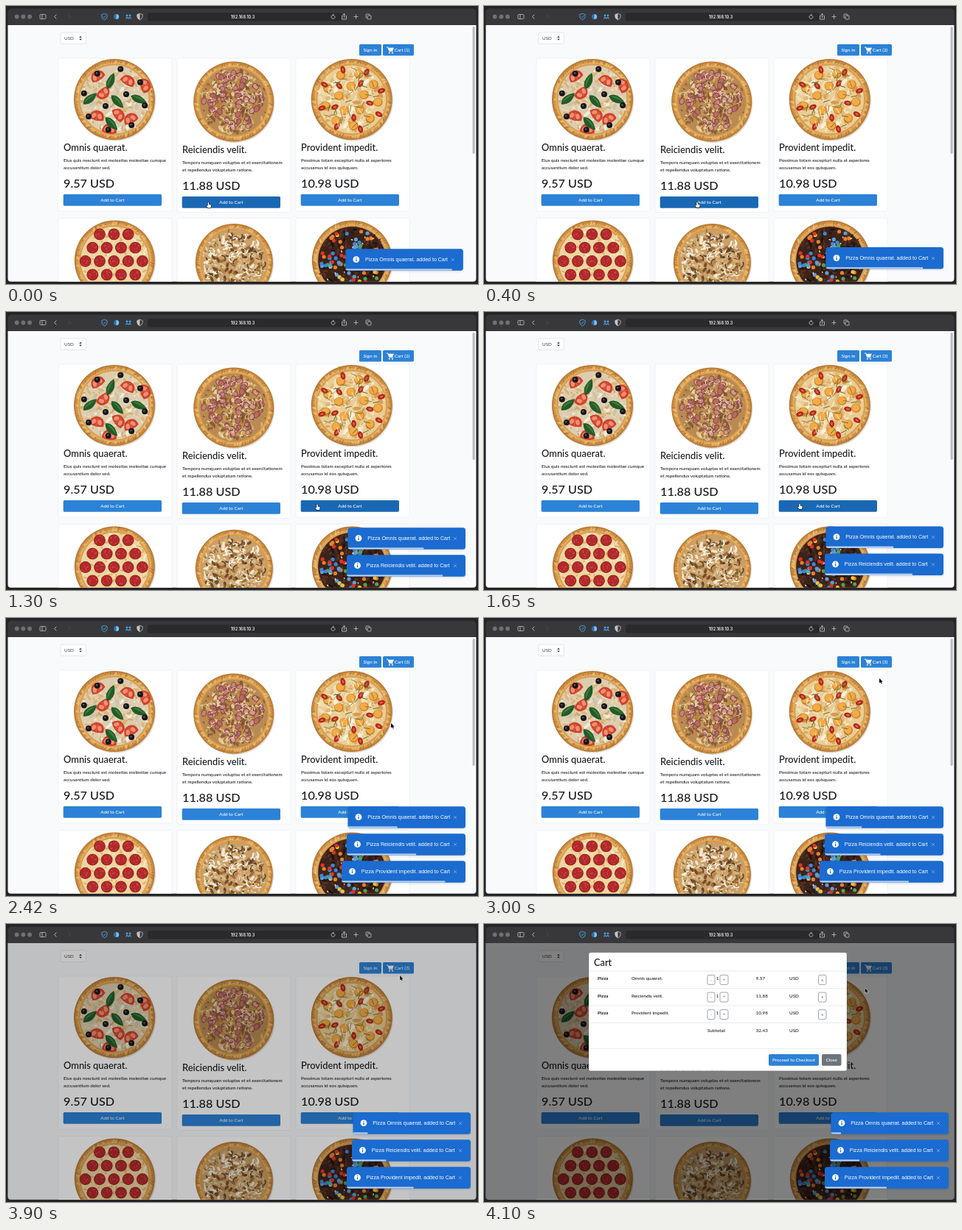
An HTML page with a canvas that plays this animation: 640 px wide and 378 px high, repeating every 8 s.

```html
<!DOCTYPE html>
<html lang="en">
<head>
<meta charset="utf-8">
<title>Pizza shop</title>
<style>
html, body { margin: 0; width: 100%; height: 100%; overflow: hidden; background: #242427; }
canvas { display: block; width: 100vw; height: 100vh; }
</style>
</head>
<body>
<canvas id="stage"></canvas>
<script>
const W = 640, H = 378, LOOP = 8000;
const BLUE = '#2c82d6', BLUE_HOVER = '#1a68b4', INK = '#171a1d', TOAST = '#1b6bd0';
const BODY = 'Lato, sans-serif';
const dpr = Math.max(1, window.devicePixelRatio || 1);

function prepare(canvas) {
  canvas.width = W * dpr;
  canvas.height = H * dpr;
  const ctx = canvas.getContext('2d');
  ctx.scale(dpr, dpr);
  return ctx;
}
const stage = prepare(document.getElementById('stage'));
const pageCanvas = document.createElement('canvas');
let c = prepare(pageCanvas);

// ---- drawing helpers ----
function box(x, y, w, h, r, fill, stroke, lw = 0.6) {
  c.beginPath();
  c.roundRect(x, y, w, h, r);
  if (fill) { c.fillStyle = fill; c.fill(); }
  if (stroke) { c.strokeStyle = stroke; c.lineWidth = lw; c.stroke(); }
}
function dot(x, y, r, fill) {
  c.fillStyle = fill;
  c.beginPath();
  c.arc(x, y, r, 0, 7);
  c.fill();
}
function arc(x, y, r, from, to, color, lw) {
  c.strokeStyle = color;
  c.lineWidth = lw;
  c.beginPath();
  c.arc(x, y, r, from, to);
  c.stroke();
}
function line(color, lw, ...p) {
  c.strokeStyle = color;
  c.lineWidth = lw;
  c.beginPath();
  for (let i = 0; i < p.length; i += 2) c.lineTo(p[i], p[i + 1]);
  c.stroke();
}
function text(s, x, y, size, color = INK, align = 'left', weight = 500, family = BODY) {
  c.font = `${weight} ${size}px ${family}`;
  c.textAlign = align;
  c.fillStyle = color;
  c.fillText(s, x, y);
}
function blob(x, y, rx, ry, angle, fill) {
  c.fillStyle = fill;
  c.beginPath();
  c.ellipse(x, y, rx, ry, angle, 0, 7);
  c.fill();
}
function shape(d, fill, x = 0, y = 0, stroke, lw = 1) {
  const p = new Path2D(d);
  c.save();
  c.translate(x, y);
  if (stroke) { c.strokeStyle = stroke; c.lineWidth = lw; c.lineJoin = 'round'; c.stroke(p); }
  if (fill) { c.fillStyle = fill; c.fill(p); }
  c.restore();
}

// ---- pizzas ----
let seed = 1;
function rnd() {
  seed = (seed * 16807) % 2147483647;
  return seed / 2147483647;
}
const pick = list => list[Math.floor(rnd() * list.length)];
function scatter(n, r, draw) {
  for (let i = 0; i < n; i++) {
    const a = rnd() * 6.283, d = r * Math.sqrt(rnd());
    draw(Math.cos(a) * d, Math.sin(a) * d, rnd() * 6.283);
  }
}
function ring(n, r, start, draw) {
  for (let i = 0; i < n; i++) {
    const a = start + i * 6.283 / n;
    draw(Math.cos(a) * r, Math.sin(a) * r, a);
  }
}
function flakes(n, rx, ry, colors) {
  scatter(n, 43, (x, y, a) => blob(x, y, rx * (0.6 + rnd() * 0.6), ry, a, pick(colors)));
}
function posed(x, y, a, draw) {
  c.save();
  c.translate(x, y);
  c.rotate(a);
  draw();
  c.restore();
}
function leaf(x, y, a) {
  posed(x, y, a, () => {
    shape('M-12 0Q-4-10 12 0Q-2 10-12 0Z', '#235a2a');
    shape('M-9-1Q-2-6 9 0Z', '#3d7a38');
  });
}
function tomato(x, y, a) {
  posed(x, y, a, () => {
    shape('M-10 3Q-9-8 1-8Q11-7 10 4Q0 8-10 3Z', '#d0402c');
    for (const s of [-1, 1]) blob(s * 4, -0.5, 2.7, 3.8, s * -0.4, '#ee9070');
    line('#e2674a', 1, 0, -6, 0, 5);
  });
}
function olive(x, y) {
  dot(x, y, 4, '#17161c');
  dot(x - 0.7, y - 0.8, 1.2, '#5c5964');
}
const toppings = {
  garden() {
    flakes(60, 5, 2, ['#f4ecdc', '#dcb67c', '#cfc3a4']);
    tomato(-23, -31, -0.6); tomato(18, -25, 0.5); tomato(41, -19, 1.3); tomato(-24, 23, 0.2);
    tomato(5, 21, 0.9); tomato(22, 27, -0.5); tomato(-15, -9, 2.4); tomato(-7, 41, 0.1);
    leaf(-5, -25, -1.2); leaf(-33, -1, -0.7); leaf(33, 0, 0.4); leaf(4, 3, 0.8); leaf(-4, 33, 0.8);
    ring(8, 42, 0.2, olive);
    olive(-12, 9); olive(16, -7);
  },
  sausage() {
    flakes(90, 5, 2.2, ['#e2c88e', '#8c5a38', '#b5813f', '#d9a566']);
    scatter(50, 41, (x, y, a) => {
      blob(x, y, 5, 3.8, a, '#8c4540');
      blob(x, y, 3.9, 2.8, a, pick(['#c68379', '#b56d64', '#d39b8c']));
    });
    scatter(45, 41, (x, y, a) => arc(x, y, 4.5, a, a + 2.6, pick(['#6d4450', '#e6d5aa', '#f0e4c4']), 1));
    flakes(80, 1.9, 0.8, ['#68702f', '#e9dbb2', '#7a4a30']);
  },
  chicken() {
    flakes(60, 5.5, 2.5, ['#f8f0da', '#e0b878', '#f1ddb0', '#d49c54']);
    const yolk = (x, y) => { dot(x, y, 6.2, '#cf7d25'); dot(x - 0.4, y - 0.5, 5.2, '#f2ab45'); };
    ring(9, 36, 0.1, yolk); ring(5, 18, 0.9, yolk);
    const red = (x, y, a) => { blob(x, y, 5.2, 3.4, a, '#b5281a'); blob(x, y, 2.2, 1.2, a, '#e06a48'); };
    ring(8, 42, 0.5, red); ring(5, 25, 0.2, red);
    scatter(60, 42, (x, y, a) => {
      const u = Math.cos(a) * 4.5, v = Math.sin(a) * 4.5;
      line(pick(['#656b34', '#8a7a3c', '#faf3e0']), 1, x - u, y - v, x + u, y + v);
    });
  },
  pepperoni() {
    for (let row = -2; row <= 2; row++)
      for (let i = -2; i <= 2; i++) {
        const x = (i + (row & 1) / 2) * 19.5 - 1, y = row * 18.5 + 1;
        if (Math.hypot(x, y) > 44) continue;
        dot(x, y, 8, '#8c1d1f');
        dot(x, y, 7.2, '#b3292b');
        scatter(7, 6, (u, v) => dot(x + u, y + v, 0.8, '#cc5550'));
      }
  },
  mushroom() {
    flakes(110, 5, 1.9, ['#f2e8d2', '#a06c38', '#744b2a', '#d8b07a', '#b9854a']);
    scatter(60, 42, (x, y, a) => arc(x, y, 5, a, a + 2.1, pick(['#faf3e4', '#d8c4a6', '#5c3f2c']), 1.7));
    flakes(55, 2, 0.9, ['#57642f', '#4d3322', '#efe2c4']);
  },
  candy() {
    flakes(80, 4, 1.5, ['#2a1712', '#543020', '#1f110d']);
    scatter(70, 43, (x, y) => dot(x, y, 2.6, pick(['#dd3428', '#3f86d8', '#f0c433', '#4aa653', '#e8812c', '#5aa0e0'])));
    flakes(25, 1.5, 0.8, ['#f0d8b0']);
  }
};
function pizza(x, y, r, base, spots, kind) {
  seed = kind.length * 991 + 7;
  c.save();
  c.translate(x, y);
  blob(1.2, 1.5, r, r, 0, 'rgba(90,70,50,.2)');
  const g = c.createRadialGradient(0, 0, r * 0.8, 0, 0, r);
  g.addColorStop(0, '#c07a30');
  g.addColorStop(0.5, '#e6b263');
  g.addColorStop(1, '#b3702a');
  dot(0, 0, r, g);
  ring(90, r * 0.93, 0, (u, v, a) => blob(u, v, 1 + rnd() * 2.6, 1, a + rnd(), pick(['#f3d29688', '#99582277', '#c8853a88'])));
  c.scale(r / 55, r / 55);
  dot(0, 0, 46.5, base);
  scatter(150, 46, (u, v, a) => blob(u, v, 1 + rnd() * 3, 1.2, a, pick(spots)));
  toppings[kind]();
  c.restore();
}

// ---- page ----
const buttons = [
  [479, 52, 30, 15.5], [511, 52, 42, 15.5],
  [77.7, 256, 133.3, 15.7], [238.7, 259, 133.3, 15.7], [399.7, 256, 133.3, 15.7]
];
const cards = [
  { x: 71, dy: 0, name: 'Omnis quaerat.', price: '9.57', info: ['Eius quis nesciunt est molestias molestiae cumque', 'accusantium dolor sed.'] },
  { x: 232, dy: 3, name: 'Reiciendis velit.', price: '11.88', info: ['Tempora numquam voluptas et et exercitationem', 'et repellendus voluptatum ratione.'] },
  { x: 393, dy: 0, name: 'Provident impedit.', price: '10.98', info: ['Possimus totam excepturi nulla at asperiores', 'accusamus id eos quisquam.'] }
];

function toolbar() {
  const grey = '#c4c4c6', blue = '#4aa3e8';
  box(2.5, 3.5, 635, 30, [5, 5, 0, 0], '#38383b');
  for (const x of [14.7, 23.4, 32.1]) dot(x, 14.5, 2.9, '#717074');
  box(46, 11.5, 8, 6, 1.2, null, grey, 0.8);
  line(grey, 0.8, 49, 11.5, 49, 17.5);
  line(grey, 0.9, 68.3, 11.7, 65.6, 14.5, 68.3, 17.3);
  line('#505054', 0.9, 84.6, 11.7, 87.3, 14.5, 84.6, 17.3);
  const shield = 'M0-4L3.7-2.7V0Q3.5 3 0 4.5Q-3.5 3-3.7 0V-2.7Z';
  shape(shield, null, 133.5, 14.3, blue, 0.9);
  line(blue, 0.9, 131.8, 14.3, 133.2, 15.8, 135.3, 13);
  dot(149.5, 14.5, 3.6, '#2c6fa6');
  shape('M0-3.6A3.6 3.6 0 0 1 0 3.6Z', '#7cc4fa', 149.5, 14.5);
  for (const x of [164, 168]) dot(x, 12.9, 1.4, blue);
  line(blue, 1.1, 162.4, 17.4, 164, 15.3, 166, 17, 168, 15.3, 169.6, 17.4);
  shape(shield, null, 181.5, 14.3, grey, 0.8);
  shape('M0-4V4.5Q-3.5 3-3.7 0V-2.7Z', grey, 181.5, 14.3);
  box(192, 9, 263, 11.5, 3, '#2a2a2d');
  text('192.168.10.3', 321, 16.6, 5.6, '#ededee', 'center', 600, 'Inter, sans-serif');
  arc(443.5, 14.8, 2.5, -0.6, 4.9, grey, 0.8);
  line(grey, 0.8, 443, 10.8, 444.8, 12.2, 443, 13.6);
  line(grey, 0.8, 457, 13.5, 455.5, 13.5, 455.5, 18, 461.5, 18, 461.5, 13.5, 460, 13.5);
  line(grey, 0.8, 458.5, 16, 458.5, 10.5);
  line(grey, 0.8, 456.7, 12.2, 458.5, 10.4, 460.3, 12.2);
  line(grey, 0.8, 471.5, 14.5, 477.5, 14.5);
  line(grey, 0.8, 474.5, 11.5, 474.5, 17.5);
  box(488, 11, 5, 5, 0.8, null, grey, 0.8);
  box(490, 13, 5, 5, 0.8, '#38383b', grey, 0.8);
}
function contentArea() {
  c.beginPath();
  c.roundRect(2.5, 26, 635, 348.7, [0, 0, 4, 4]);
}
function drawPage() {
  c.fillStyle = '#242427';
  c.fillRect(0, 0, W, H);
  toolbar();
  c.save();
  contentArea();
  c.fillStyle = '#f8fafc';
  c.fill();
  c.clip();
  box(74, 36, 34.5, 15.5, 2, '#fff', '#d3d8dd');
  text('USD', 79, 46, 6.3, '#495057');
  shape('M-1.8-.8L0-3L1.8-.8ZM-1.8.8L0 3L1.8.8Z', '#343a40', 101, 43.8);
  for (const k of cards) {
    box(k.x, 71, 154, 208 + k.dy / 2, 2, '#fff', '#e8ebee');
    box(k.x, 288.5, 154, 208, 2, '#fff', '#e8ebee');
    text(k.name, k.x + 7, 196.8 + k.dy, 12.9);
    k.info.forEach((s, i) => text(s, k.x + 7, 212.2 + k.dy + i * 9.7, 6.3));
    text(k.price + ' USD', k.x + 7, 246.6 + k.dy, 16.2);
  }
  pizza(147, 127, 55, '#dccdae', ['#f0e8d6', '#d2a866', '#e9dcc0'], 'garden');
  pizza(308.7, 130, 54.5, '#b98a52', ['#d8b878', '#8f6038', '#c99a58'], 'sausage');
  pizza(468.7, 127, 55, '#e9cd94', ['#f6e9c8', '#dba85c', '#f0dfb0'], 'chicken');
  pizza(147.3, 346, 54.5, '#eed5a0', ['#f7eac8', '#e0b068', '#f2dfae'], 'pepperoni');
  pizza(309.3, 348.5, 52.5, '#c9a068', ['#e6d3aa', '#a37540', '#dcc294'], 'mushroom');
  pizza(469.3, 346, 54.5, '#3c231a', ['#4a2b20', '#2b1812', '#5a3626'], 'candy');
  c.restore();
}
function drawButtons(hover, count) {
  buttons.forEach(([x, y, w, h], i) => {
    box(x, y, w, h, 1.6, i === hover ? BLUE_HOVER : BLUE);
    if (i > 1) text('Add to Cart', x + w / 2, y + 10.2, 6.3, '#fff', 'center');
  });
  text('Sign in', 494, 61.8, 6.5, '#fff', 'center');
  line('#fff', 1, 516, 56, 517.7, 56, 519.8, 61.7, 524.8, 61.7);
  shape('M2 1H10L8.2 5H3.6Z', '#fff', 516, 55.8);
  dot(519.8, 63.8, 1, '#fff');
  dot(524, 63.8, 1, '#fff');
  text(`Cart (${count})`, 526.7, 61.8, 6.3, '#fff');
}

// ---- cart dialog ----
function tiny(x, y, w, label) {
  box(x, y, w, 13, 2, '#fff', '#777e85', 0.7);
  text(label, x + w / 2, y + 8.2, 6, '#6c757d', 'center');
}
function drawModal() {
  box(142, 38.8, 350, 161, 2.5, '#fff', 'rgba(0,0,0,.25)');
  text('Cart', 149, 57.2, 12.8);
  for (const y of [64, 87.5, 111, 134.5, 169.5]) line('#dee2e6', 0.7, 142, y, 492, y);
  cards.forEach((p, i) => {
    const y = 76.2 + i * 23.6;
    text('Pizza', 154, y, 6.3, INK, 'left', 700);
    text(p.name, 200, y, 6.3);
    tiny(303, y - 6.8, 10, '-');
    text('1', 316.5, y, 6.3, INK, 'center');
    tiny(320, y - 6.8, 11, '+');
    text(p.price, 368.7, y, 6.3);
    text('USD', 414, y, 6.3);
    tiny(453.5, y - 6.8, 10.5, 'x');
  });
  text('Subtotal:', 303, 147.2, 6.3);
  text('32.43', 368.7, 147.2, 6.3);
  text('USD', 414, 147.2, 6.3);
  box(386, 177, 68, 15.7, 2, BLUE);
  text('Proceed to Checkout', 420, 187, 6.25, '#fff', 'center');
  box(458, 177, 26.5, 15.7, 2, '#6c757d');
  text('Close', 471.2, 187, 6.3, '#fff', 'center');
}

// ---- toasts ----
const clamp = v => Math.min(1, Math.max(0, v));
const inOut = v => { v = clamp(v); return v * v * (3 - 2 * v); };
const born = [-475, 342, 1597], lefts = [463.5, 462, 455];
const stops = [[0, 1470], [0.6, -12.2], [0.75, 4.9], [0.9, -2.5], [1, 0]];

function bounce(age) {
  const p = clamp(age / 750);
  for (let i = 1; i < stops.length; i++) {
    const [a, from] = stops[i - 1], [b, to] = stops[i];
    if (p <= b) return from + (to - from) * (1 - (1 - (p - a) / (b - a)) ** 3);
  }
}
function drawToast(i, t, shift) {
  const age = t - born[i];
  if (age < 0) return;
  const x = lefts[i] + shift + bounce(age), w = 623 - lefts[i];
  let y = 330.2;
  for (let j = i + 1; j < 3; j++) y -= 37 * inOut((t - born[j]) / 400);
  c.save();
  c.globalAlpha = clamp(age / 450);
  c.shadowColor = 'rgba(0,0,0,.14)';
  c.shadowBlur = 3 * dpr;
  c.shadowOffsetY = dpr;
  box(x, y, w, 29.5, 3.5, TOAST);
  c.shadowColor = 'transparent';
  c.clip();
  c.fillStyle = 'rgba(255,255,255,.7)';
  c.fillRect(x, y + 27.2, w * clamp(1 - age / 5000), 2.3);
  dot(x + 14.5, y + 14.5, 4.4, '#fff');
  c.fillStyle = TOAST;
  c.fillRect(x + 13.9, y + 13.9, 1.3, 3.2);
  c.fillRect(x + 13.9, y + 11.7, 1.3, 1.3);
  text(`Pizza ${cards[i].name} added to Cart`, x + 26.7, y + 17, 7.05, '#fff', 'left', 400, 'Liberation Sans, Arial, sans-serif');
  const m = x + w - 14, n = y + 14.9;
  line('#7fb0ea', 0.8, m - 2.1, n - 2.1, m + 2.1, n + 2.1);
  line('#7fb0ea', 0.8, m - 2.1, n + 2.1, m + 2.1, n - 2.1);
  c.restore();
}

// ---- pointer: time, x, y ----
const track = [
  [0, 275, 271], [150, 283, 271], [400, 289.5, 270.5], [580, 300, 269], [630, 330, 268], [680, 376, 267],
  [1300, 422.5, 265.5], [1600, 428, 264.5], [1650, 428.5, 264.5], [2420, 522, 143], [2800, 531, 112],
  [3000, 536, 82], [3200, 538, 68], [3260, 538, 66.5], [3320, 538, 66], [3900, 534, 70], [4100, 516.5, 87]
];
function drawPointer(x, y, hand) {
  if (hand) {
    shape('M-1.3-3.6Q-.5-4.5 .2-3.6V-1L2.7-.4Q3.4 0 3.1 1.3L2.4 3.6H-1.1L-3.2 .8Q-2.8-.3-1.3 .9Z', '#fff', x, y, '#151515', 1.1);
  } else {
    shape('M0 0V6.6L1.6 5.2L2.7 7.6L3.8 7.1L2.7 4.8H4.8Z', '#0b0b0b', x, y, '#fff', 1);
  }
}

// The picture advances in hard steps, at the times in the pointer track.
function draw(now) {
  const t = now % LOOP;
  const [at, x, y] = track.findLast(k => k[0] <= t);
  const open = at >= 3900;
  const hover = open ? -1 : buttons.findIndex(b => x > b[0] && x < b[0] + b[2] && y > b[1] && y < b[1] + b[3]);
  c.drawImage(pageCanvas, 0, 0, W, H);
  c.save();
  contentArea();
  c.clip();
  drawButtons(hover, at < 400 ? 1 : at < 1600 ? 2 : 3);
  if (open) {
    c.fillStyle = `rgba(0,0,0,${0.5 * clamp((at - 3830) / 150)})`;
    c.fillRect(0, 26, W, 350);
    if (at > 4000) drawModal();
  } else {
    box(632.6, 28, 3.2, 173, 1.6, '#bcbdbe');
  }
  for (let i = 0; i < 3; i++) drawToast(i, at, open ? 7 : 0);
  drawPointer(x, y, hover >= 0);
  c.restore();
}

drawPage();
c = stage;
let start;
function tick(now) {
  start ??= now;
  draw(Math.max(0, now - start));
  requestAnimationFrame(tick);
}
requestAnimationFrame(tick);
</script>
</body>
</html>
```
